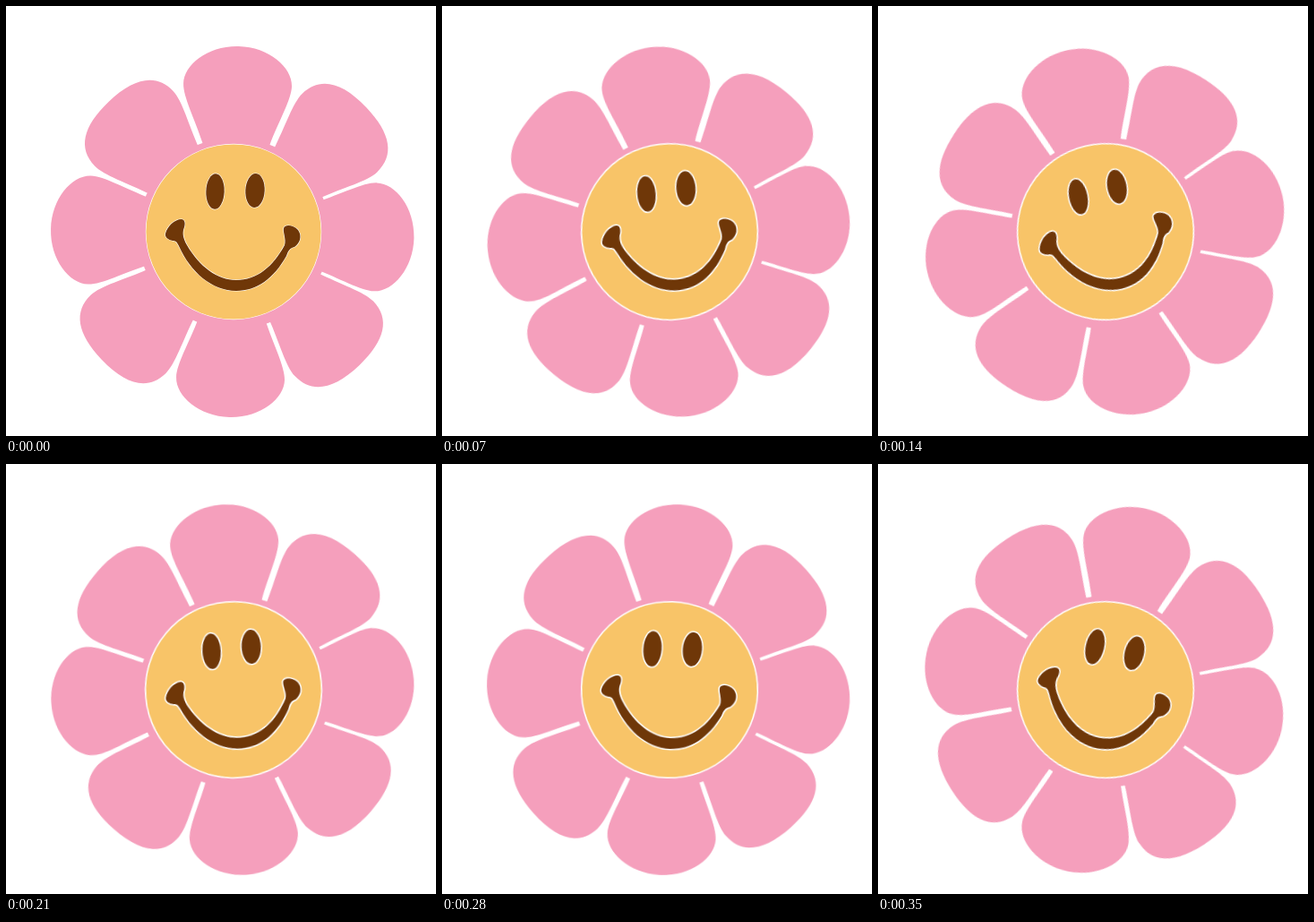
Animation of 480x480 px, one loop 420 ms. Source, as an HTML page:

```html
<!DOCTYPE html>
<html lang="en">
<head>
<meta charset="utf-8">
<title>Wobbling daisy</title>
<style>
  html, body { margin: 0; width: 100%; height: 100%; overflow: hidden; background: #fff; }
  svg { display: block; width: 100vw; height: 100vh; }
  .flower {
    transform-origin: 254px 252px;
    animation: wobble 420ms step-end infinite;
  }
  .petals { fill: #f59fbc; }
  .face { stroke: #fff; paint-order: stroke; }
  .disc { fill: #f8c468; }
  .ink { fill: #6f3708; }
  @keyframes wobble {
    0%      { transform: rotate(0deg); stroke-width: 1.2px; }
    16.667% { transform: rotate(-6.9deg); stroke-width: 3px; }
    33.333% { transform: rotate(-13.4deg); stroke-width: 3px; }
    50%     { transform: rotate(-5.2deg); stroke-width: 3px; }
    66.667% { transform: rotate(1.9deg); stroke-width: 3px; }
    83.333% { transform: rotate(10.7deg); stroke-width: 3px; }
    100%    { transform: rotate(0deg); stroke-width: 1.2px; }
  }
</style>
</head>
<body>
<svg viewBox="0 0 480 480">
  <defs>
    <path id="round" d="M0 -80 L-37.5 -97 C-47 -124 -60.5 -148 -60.5 -163 C-60.5 -184 -34 -206 0 -206
      C34 -206 60.5 -184 60.5 -163 C60.5 -148 47 -124 37.5 -97 Z"/>
    <path id="flat" d="M0 -80 L-37.5 -97 C-47 -124 -60.5 -148 -60.5 -163 C-60.5 -190 -40 -204 0 -204
      C40 -204 60.5 -190 60.5 -163 C60.5 -148 47 -124 37.5 -97 Z"/>
  </defs>
  <g class="flower">
    <g class="petals" transform="translate(254.5 254) rotate(1.4)">
      <circle r="107"/>
      <use href="#round" y="-3"/>
      <use href="#flat" transform="rotate(45)"/>
      <use href="#round" y="5" transform="rotate(90)"/>
      <use href="#flat" y="1" transform="rotate(135)"/>
      <use href="#round" y="1" transform="rotate(180)"/>
      <use href="#flat" transform="rotate(225)"/>
      <use href="#round" y="1.5" transform="rotate(270)"/>
      <use href="#flat" y="1" transform="rotate(315)"/>
    </g>
    <g class="face">
      <circle class="disc" cx="254" cy="252" r="97.6"/>
      <g class="ink">
        <ellipse rx="10.2" ry="19.8" transform="translate(233.5 207) rotate(2)"/>
        <ellipse rx="10.7" ry="19" transform="translate(278 206) rotate(3)"/>
        <path d="M178 254 C180 246 188 238 196 238 C201 239 200 245 198 250 C197 255 198 260 202 267
          C216 291 236 306 257 306 C280 306 298 291 311 267 C313 260 309 253 310 248
          C312 243 321 245 326 250 C331 257 328 265 322 269 C317 270 315 273 313 279
          C299 304 280 318 257 318 C230 318 206 297 193 268 C191 264 190 262 186 262
          C181 261 177 258 178 254 Z"/>
      </g>
    </g>
  </g>
</svg>
</body>
</html>
```
